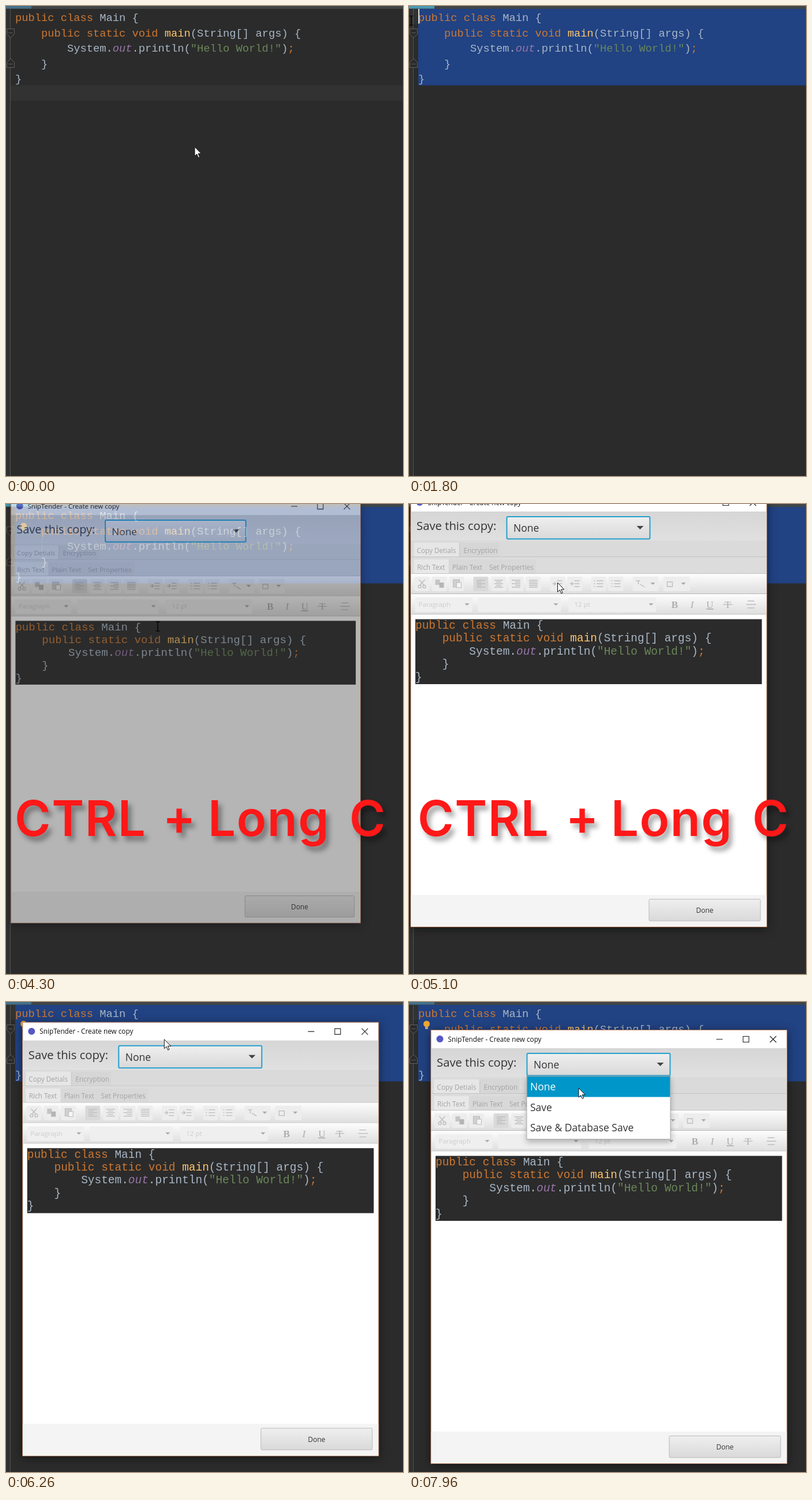
An HTML page that plays this animation: 688 px wide and 814 px high, repeating every 8000 ms.

```html
<!DOCTYPE html>
<html lang="en">
<head>
<meta charset="utf-8">
<title>Copy dialog</title>
<style>
html, body { margin: 0; width: 100%; height: 100%; overflow: hidden; background: #2b2b2b; }
svg { display: block; width: 688px; height: 814px; }
.code { font-family: "Liberation Mono", "Courier New", monospace; fill: #a9b7c6; }
.k { fill: #cc7832; }
.m { fill: #ffc66d; }
.s { fill: #6a8759; }
.f { fill: #9876aa; font-style: italic; }
.ui { font-family: "Open Sans", "Noto Sans", sans-serif; fill: #333; }
.off { fill: #a3a3a3; }
.icon { stroke: #bdbdbd; stroke-width: 1.4; fill: none; }
.big { font: 600 85px Inter, sans-serif; fill: #ff1818; filter: drop-shadow(6px 8px 4px rgba(0,0,0,.35)); }
#win { filter: drop-shadow(0 3px 8px rgba(0,0,0,.5)); }
#menu { filter: drop-shadow(0 5px 5px rgba(0,0,0,.25)); }
</style>
</head>
<body>
<svg id="stage" viewBox="0 0 688 814"></svg>
<script>
const LOOP = 8000, LEFT = 16, TOP = 5, ROW = 26.5, CHAR = 11.25;
const SOURCE = [
  'public class Main {',
  '    public static void main(String[] args) {',
  '        System.out.println("Hello World!");',
  '    }',
  '}',
  ''
];

const rect = (x, y, w, h, fill, more = '') =>
  `<rect x="${x}" y="${y}" width="${w}" height="${h}" fill="${fill}" ${more}/>`;
const path = (d, more) => `<path d="${d}" ${more}/>`;
const label = (x, y, size, text, more = 'class="ui"') =>
  `<text x="${x}" y="${y}" font-size="${size}" ${more}>${text}</text>`;
const fade = (id, a, b) =>
  `<linearGradient id="${id}" x2="0" y2="1"><stop stop-color="${a}"/><stop offset="1" stop-color="${b}"/></linearGradient>`;
const arrowDown = (x, y, r, fill) => path(`M${x - r} ${y}h${2 * r}l${-r} ${r}z`, `fill="${fill}"`);

const paint = line => line.replace(
  /("[^"]*")|\b(public|class|static|void)\b|(;)|\b(main)\b|\b(out)\b/g,
  (all, str, word, semi, method) =>
    `<tspan class="${str ? 's' : word || semi ? 'k' : method ? 'm' : 'f'}">${all}</tspan>`);

function code(x, y, size, pitch) {
  return SOURCE.map((line, i) => {
    const text = line.trim();
    const indent = (line.length - text.length) * size * 0.6;
    return label(x + indent, y + i * pitch, size, paint(text), 'class="code"');
  }).join('');
}

function editor() {
  const fold = 'fill="#2b2b2b" stroke="#5e6060"';
  return rect(0, 0, 688, 814, '#2b2b2b') +
    rect(0, 0, 7, 814, '#2e3031') +
    rect(8, 0, 680, ROW, '#323232', 'id="row"') +
    path('', 'id="sel" fill="#214283"') +
    rect(7, 5, 1, 814, '#555') +
    rect(0, 0, 688, 5, '#414547') +
    rect(0, 0, 44, 4.5, '#4a9ab4', 'id="tab"') +
    path('M1.5 39.5h13v9l-6.5 6.5l-6.5-6.5zM4.5 46.5h7', fold) +
    path('M1.5 106.5h13v-9l-6.5-6.5l-6.5 6.5zM4.5 100.5h7', fold) +
    code(LEFT, 26, 18.75, ROW) +
    `<g id="bulb"><circle cx="30.500" cy="38" r="5.5" fill="#f0a732"/>` +
    rect(28, 43, 5, 4, '#b9a98a') + rect(62, 59, 1, 25, '#3b5a94') + '</g>' +
    rect(0, 0, 2, 25.5, '#dcdcdc', 'id="caret"');
}

function alignIcon(x, side) {
  let d = '';
  for (let i = 0; i < 5; i++) {
    const w = i % 2 && side >= 0 ? 9 : 15;
    d += `M${x - 7.5 + (15 - w) * Math.max(side, 0)} ${167 + i * 3}h${w}`;
  }
  return path(d, 'class="icon"');
}

function toolbars() {
  const icon = d => path(d, 'class="icon"');
  let out = rect(15, 156, 616, 34, 'url(#bar)') + rect(15, 190, 616, 1, '#b9b9b9') +
    rect(15, 191, 616, 35, 'url(#bar)') + rect(15, 225.5, 616, 1, '#c4c4c4');
  for (const x of [34, 64, 94, 136, 167, 197, 227, 269, 299, 340, 370])
    out += rect(x - 13, 161, 26, 25, x === 136 ? '#d9d9d9' : '#ededed', 'rx="2"');
  out += rect(399, 161, 45, 25, '#ededed', 'rx="2"') + rect(452, 161, 46, 25, '#ededed', 'rx="2"');
  out += icon('M29 166l9 10M39 166l-9 10') +
    `<circle cx="30" cy="178" r="2.5" class="icon"/><circle cx="38" cy="178" r="2.500" class="icon"/>`;
  out += rect(57, 166, 8, 9, '#c4c4c4') + rect(64, 171, 8, 9, '#b5b5b5');
  out += rect(88, 166, 11, 13, '#d0d0d0', 'stroke="#bbb"') + rect(94, 171, 8, 9, '#f4f4f4', 'stroke="#bbb"');
  [[136, 0], [167, .5], [197, 1], [227, -1]].forEach(a => out += alignIcon(...a));
  for (const x of [269, 299]) out += icon(`M${x - 1} 168h9m-9 5h9m-9 5h9M${x - 9} 173h6m-3-3l3 3l-3 3`);
  for (const x of [340, 370]) out += icon(`M${x - 3} 168h11m-11 5h11m-11 5h11M${x - 8} 168h2m-2 5h2m-2 5h2`);
  out += icon('M405 168h7m-3 0v6m3 0l8 5') + icon('M459 170h9v8h-9z');
  for (const x of [434, 487]) out += arrowDown(x, 171, 4, '#aaa');
  for (const [x, w] of [[22, 99], [131, 144], [288, 152]]) {
    out += rect(x, 197, w, 25, '#efefef', 'rx="2"') + arrowDown(x + w - 9, 207, 4, '#aaa');
  }
  out += label(28, 213, 11.5, 'Paragraph', 'class="ui" style="fill:#ccc"') +
    label(298, 213, 11.5, '12 pt', 'class="ui" style="fill:#ccc"');
  const letter = (x, ch, more) => label(x, 215, 17, ch,
    `font-family="Liberation Serif, serif" fill="#adadad" text-anchor="middle" ${more}`);
  return out + letter(472, 'B', 'font-weight="bold"') + letter(502, 'I', 'font-style="italic"') +
    letter(533, 'U', 'text-decoration="underline"') + letter(564, 'T', '') +
    icon('M556 209h16') + icon('M598 203h12m-14 6h17m-15 6h12');
}

function dialog() {
  const size = 11.75, gray = 'class="ui off"';
  return rect(14.5, 16.5, 617, 751, '#fff', 'stroke="#b97a58"') +
    '<circle cx="30" cy="32" r="6" fill="#5457c4"/>' +
    label(44, 36.5, size, 'SnipTender - Create new copy', 'class="ui" style="fill:#111"') +
    path('M509 32.500h11M555.5 27.500h10v10h-10zM602 27l11 11M613 27l-11 11', 'stroke="#222" fill="none" stroke-width="1.1"') +
    rect(15, 48, 616, 50, 'url(#head)') +
    label(24.5, 80, 20.3, 'Save this copy:') +
    rect(181, 57, 248, 38.5, 'url(#combo)', 'rx="2" stroke="#24a0cf" stroke-width="2"') +
    rect(182, 58, 246, 36.5, '#fff', 'id="hover" opacity=".35"') +
    label(192.5, 83, 17.5, 'None') + arrowDown(412, 73, 6, '#444') +
    rect(15, 98, 616, 29, '#dadada') + rect(20, 102, 78, 25, '#e6e6e6') + rect(100, 102, 68, 24, '#d6d6d6') +
    rect(15, 126, 616, 1, '#c3c3c3') + path('M99.5 102v24', 'stroke="#c6c6c6"') +
    label(25, 119.5, size, 'Copy Detials', gray) + label(106, 119.5, size, 'Encryption', gray) +
    rect(15, 127, 616, 29, '#dcdcdc') + rect(20, 131, 60, 25, '#e8e8e8') + rect(81, 131, 151, 24, '#d8d8d8') +
    rect(15, 155, 616, 1, '#c3c3c3') +
    label(25.5, 148.5, size, 'Rich Text', gray) + label(86.5, 148.5, size, 'Plain Text', gray) +
    label(150.5, 148.5, size, 'Set Properties', gray) +
    toolbars() +
    rect(22.5, 234.5, 600.5, 112.5, '#2b2b2b') + code(22.5, 251, 19.45, 22.4) +
    rect(15, 712, 616, 55, '#f4f4f4') +
    rect(427.5, 719.5, 193, 37.5, 'url(#combo)', 'rx="2" stroke="#b9b9b9"') +
    label(524, 743, 12, 'Done', 'class="ui" text-anchor="middle"') +
    '<g id="menu">' + rect(180.5, 96.5, 249, 109, '#fff', 'stroke="#aaa"') + rect(181, 97, 248, 35.5, '#0096c9') +
    label(186.5, 121, 17.5, 'None', 'class="ui" style="fill:#fff"') +
    label(186.5, 156.5, 17.5, 'Save') + label(186.5, 192, 17.5, 'Save &amp; Database Save') + '</g>';
}

document.getElementById('stage').innerHTML =
  '<defs>' + fade('head', '#d6d6d6', '#e0e0e0') + fade('bar', '#fdfdfd', '#dedede') +
  fade('combo', '#efefef', '#d9d9d9') + '</defs>' +
  editor() +
  `<g id="win">${dialog()}</g>` +
  '<g id="big" class="big"><text x="15" y="575" letter-spacing="1.5">CTRL</text>' +
  '<text x="300" y="573" text-anchor="middle">+</text>' +
  '<text x="350" y="575" letter-spacing="1.5">Long</text><text x="595" y="575">C</text></g>' +
  path('M-3.500-8h2.500l1 1l1-1h2.500M0-7v14M-3.500 8h2.500l1-1l1 1h2.500', 'id="beam" fill="none" stroke="#050505" stroke-width="1.4"') +
  path('M0 0v16l3.700-3.500l2.600 6l2.400-1l-2.600-5.800h5.200z', 'id="arrow" fill="#fff" stroke="#111" stroke-width="1"');

const el = {};
document.querySelectorAll('svg [id]').forEach(n => el[n.id] = n);

// Pointer hot spot and window offset: [time, x, y]
const POINTER = [
  [60, 327, 244], [130, 332, 242], [860, 247, 187], [1000, 247, 187], [1100, 210, 166], [1130, 210, 166],
  [1200, 180, 158], [1330, 150, 133], [1560, 66, 62], [1700, 17, 14], [1800, 4, 25], [1830, 1, 36],
  [1860, -10, 37], [2100, -10, 37], [2830, 248, 205], [3160, 248, 205], [3930, 263, 212],
  [4860, 263, 212], [5500, 248.5, 11], [5730, 248.5, 11], [6900, 283.5, 78], [7160, 292, 108],
  [7480, 292, 108], [7930, 294, 149]
];
const DRAG = [[5730, -11.5, -35], [5960, 0, 0], [6200, 13, 17], [6530, 20, 26], [6660, 20, 28], [6860, 23.5, 32]];
// Opening pop: [time, opacity, scale]
const POP = [[4260, .3, .95], [4300, .65, .982], [4400, .85, .99], [4450, .95, .997], [4530, 1, 1]];

function at(keys, t) {
  const i = keys.findIndex(k => k[0] > t);
  if (i < 0) return keys[keys.length - 1].slice(1);
  if (!i) return keys[0].slice(1);
  const a = keys[i - 1], b = keys[i], p = (t - a[0]) / (b[0] - a[0]);
  return [a[1] + (b[1] - a[1]) * p, a[2] + (b[2] - a[2]) * p];
}
const clamp = (v, a, b) => Math.min(b, Math.max(a, v));
const show = (n, on) => n.setAttribute('visibility', on ? 'visible' : 'hidden');
const put = (n, x, y) => n.setAttribute('transform', `translate(${x} ${y})`);

function draw(t) {
  const win = at(DRAG, t);
  const dragging = t >= 5730 && t < 6900;
  const [x, y] = dragging ? [win[0] + 260, win[1] + 46] : at(POINTER, t);
  const beam = t >= 60 && t < 4860;
  show(el.beam, beam);
  show(el.arrow, !beam);
  put(beam ? el.beam : el.arrow, x, y);

  // Selection grows from the last line up to the pointer
  let row = 5, col = 0;
  if (t >= 1130) {
    const [px, py] = at(POINTER, Math.min(t, 1700));
    row = clamp(Math.floor((py - TOP) / ROW), 0, 5);
    col = clamp(Math.round((px - LEFT) / CHAR), 0, SOURCE[row].length);
  }
  const cx = LEFT + col * CHAR, cy = TOP + row * ROW;
  put(el.row, 0, cy);
  put(el.caret, cx, cy);
  el.sel.setAttribute('d', row < 5 ? `M${cx} ${cy}H688V137.500H${LEFT}V${cy + ROW}H${cx}z` : '');
  show(el.caret, (t >= 600 && t < 2660) || (t >= 3160 && t < 3660));
  show(el.bulb, t >= 2160);
  el.tab.setAttribute('fill', t >= 500 && t < 4400 ? '#4a9ab4' : '#45718a');

  el.big.setAttribute('opacity', clamp((t - 2100) / 500, 0, 1) * clamp((5930 - t) / 200, 0, 1));

  show(el.win, t >= 4260);
  const [, alpha, scale] = POP.filter(k => k[0] <= t).pop() || POP[0];
  el.win.setAttribute('opacity', alpha);
  el.win.setAttribute('transform',
    `translate(${win[0] + 323} ${win[1] + 392}) scale(${scale}) translate(-323 -392)`);
  const hx = x - win[0], hy = y - win[1];
  show(el.hover, t >= 4860 && hx > 180 && hx < 430 && hy > 56 && hy < 96);
  show(el.menu, t >= 7460);
}

const start = performance.now();
function tick() {
  draw((performance.now() - start) % LOOP);
  requestAnimationFrame(tick);
}
tick();
</script>
</body>
</html>
```
